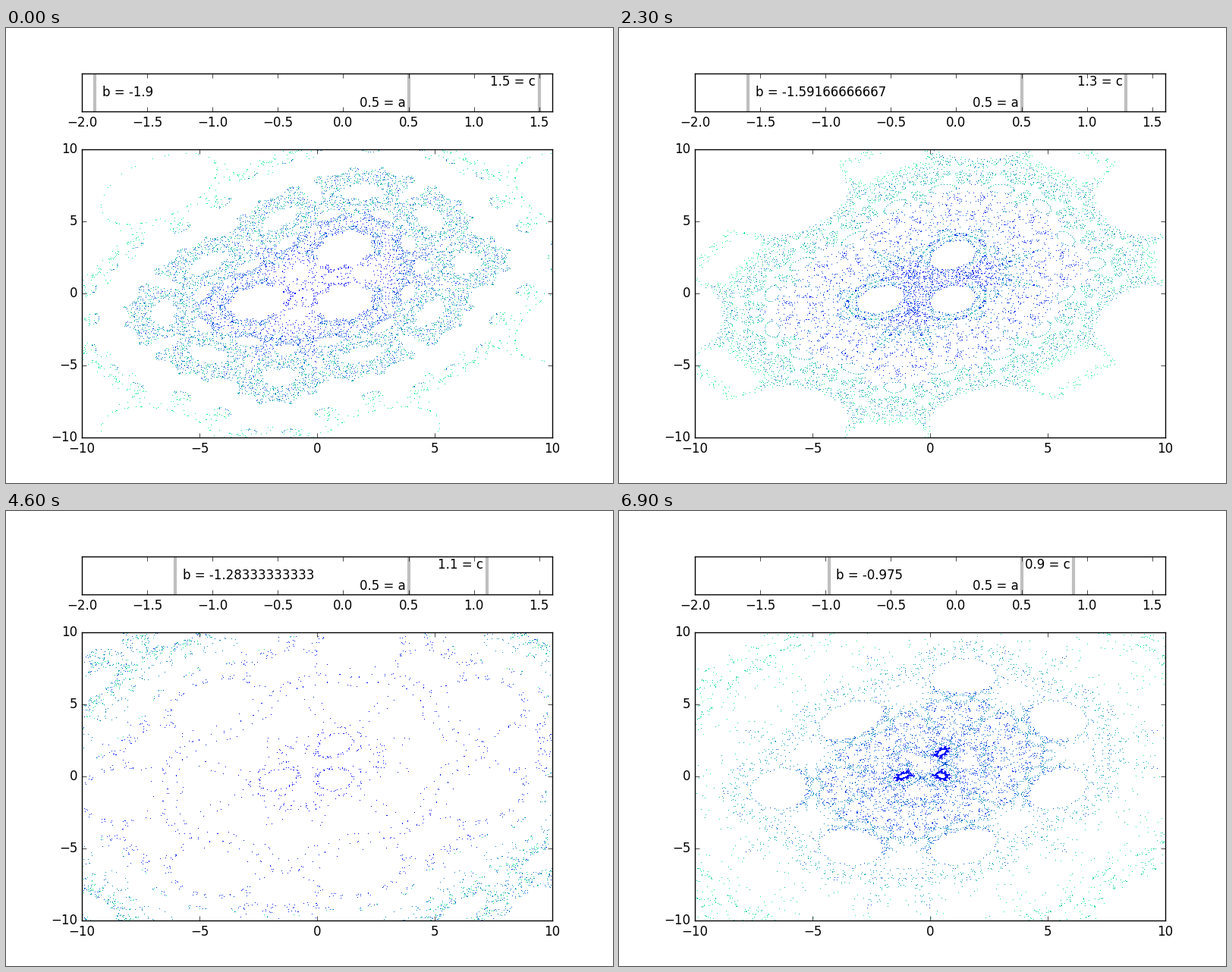
Recreate the animation shown at these times as a matplotlib script. Size 800 by 600 pixels, loop 8 s.

```python
import math

import matplotlib.pyplot as plt
import numpy as np
from matplotlib.animation import FuncAnimation

plt.style.use("classic")
plt.rcParams["font.family"] = "DejaVu Sans"

LOOP, HOLD, INTERVAL = 8000, 1150, 50
STEPS = 7
POINTS, SHADES = 10000, 100
A = 0.5


def params(step):
    """Values of b and c after a number of steps."""
    return -1.9 + step * 1.85 / 12, 1.5 - step * 0.1


def hopalong(a, b, c):
    """Orbit of the origin under Martin's map."""
    x = y = 0.0
    orbit = np.empty((POINTS, 2))
    for n in range(POINTS):
        orbit[n] = x, y
        sign = (x > 0) - (x < 0)
        x, y = y - sign * math.sqrt(abs(b * x - c)), a - x
    return orbit.reshape(SHADES, -1, 2)


orbits = [hopalong(A, *params(step)) for step in range(STEPS)]

fig = plt.figure(figsize=(8, 6), dpi=100, facecolor="white")
bar = fig.add_axes([0.125, 490 / 600, 0.775, 50 / 600])
bar.set(xlim=(-2, 1.6), ylim=(0, 1), yticks=[])
plot = fig.add_axes([0.125, 0.1, 0.775, 380 / 600])
plot.set(xlim=(-10, 10), ylim=(-10, 10),
         xticks=range(-10, 11, 5), yticks=range(-10, 11, 5))


def label(y, dx, align):
    """Text beside a value on the bar, shifted by dx pixels."""
    return bar.annotate("", (0, y), xytext=(dx * 0.72, 0), ha=align, va="baseline",
                        textcoords="offset points", fontsize=12)


lines = {name: bar.axvline(0, color="0.75", lw=3) for name in "abc"}
labels = {"a": label(0.12, -3.8, "right"),
          "b": label(0.40, 9.6, "left"),
          "c": label(0.68, -4.7, "right")}
dots = [plot.plot([], [], ",", color=plt.cm.winter(k / (SHADES - 1)))[0]
        for k in range(SHADES)]


def update(frame):
    step = min(frame * INTERVAL // HOLD, STEPS - 1)
    b, c = params(step)
    texts = {"a": f"{A} = a", "b": f"b = {b:.12g}", "c": f"{c:.1f} = c"}
    for name, value in zip("abc", (A, b, c)):
        lines[name].set_xdata([value, value])
        labels[name].xy = (value, labels[name].xy[1])
        labels[name].set_text(texts[name])
    for line, part in zip(dots, orbits[step]):
        line.set_data(part[:, 0], part[:, 1])
    return []


anim = FuncAnimation(fig, update, frames=LOOP // INTERVAL, interval=INTERVAL,
                     repeat=True, repeat_delay=0)
plt.show()
```
